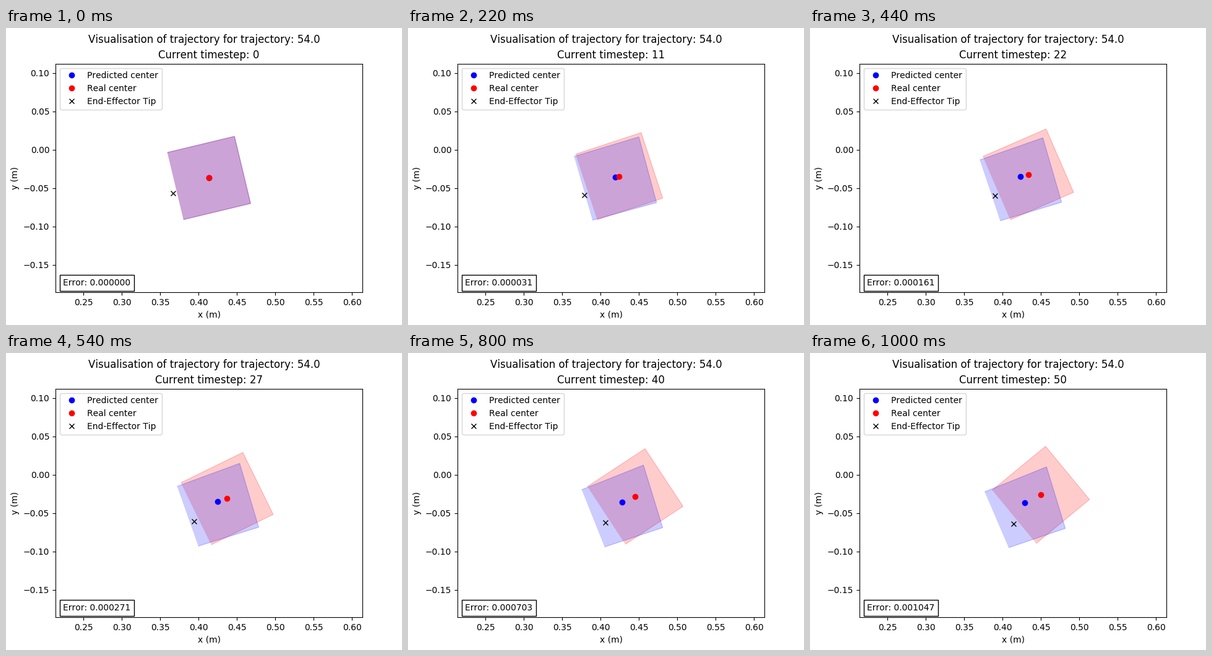
A matplotlib script that plays this animation: 640x480 px, repeating every 1020 ms.

```python
import matplotlib.pyplot as plt
import numpy as np
from matplotlib.animation import FuncAnimation
from matplotlib.patches import Polygon

plt.rcParams["text.kerning_factor"] = 6     # plain advance widths

FRAMES, INTERVAL = 51, 20
CENTER = np.array([0.4137, -0.0368])        # start of the square, middle of the view
SIDE = 0.09
HALF_VIEW = np.array([0.2, 0.2 * 369.6 / 496])
MM = 0.001

time = np.linspace(0, 1, FRAMES)[:, None]


def glide(start, shift, bow):
    """Move by `shift` mm along a parabola that swells by `bow` mm halfway."""
    return start + MM * (time * shift + 4 * time * (1 - time) * bow)


def square(center, angle):
    """Corners from top left, clockwise."""
    a = np.radians(angle)
    right = np.array([np.cos(a), np.sin(a)]) * SIDE / 2
    up = np.array([-right[1], right[0]])
    return center + np.array([up - right, up + right, right - up, -up - right])


def error_curve():
    """Roughly quadratic growth, fitted through four readings."""
    t = np.array([0.44, 0.66, 0.8, 1])
    e = np.array([161, 448, 703, 1047]) * 1e-6
    return time[:, 0] ** 2 * np.polyval(np.polyfit(t, e / t ** 2, 3), time[:, 0])


real = glide(CENTER, np.array([36.4, 10.6]), np.array([3.9, 0]))
angle = 13.5 + 26 * time[:, 0] - 6 * time[:, 0] * (1 - time[:, 0])
pred = glide(CENTER, np.array([15.6, 0.2]), np.array([2.9, 1.5]))
tip = glide(CENTER + MM * np.array([-46.6, -20.2]),
            np.array([47.6, -6.5]), np.array([1.9, -0.4]))

# The predicted corners drift apart, so the square warps
shifts = np.array([(17.4, -18.7), (10.5, -7.2), (14, 0.1), (27.6, -4)])
bows = np.array([(3.4, -1.5), (1.1, 1.3), (3, 1.6), (4.5, 0.2)])
corners = np.stack([glide(*c) for c in zip(square(CENTER, angle[0]), shifts, bows)],
                   axis=1)
error = error_curve()

fig, ax = plt.subplots(figsize=(6.4, 4.8), dpi=100)
fig.suptitle("Visualisation of trajectory for trajectory: 54.0")
low, high = CENTER - HALF_VIEW, CENTER + HALF_VIEW
ax.set(xlim=(low[0], high[0]), ylim=(low[1], high[1]),
       xlabel="x (m)", ylabel="y (m)")
title = ax.set_title("")

real_box, pred_box = [
    ax.add_patch(Polygon(corners[0], closed=False, color=c, alpha=0.2))
    for c in ("red", "blue")]
pred_dot, = ax.plot([], [], "o", color="blue", label="Predicted center")
real_dot, = ax.plot([], [], "o", color="red", label="Real center")
tip_mark, = ax.plot([], [], "x", color="black", label="End-Effector Tip")
ax.legend(loc="upper left")
note = ax.text(CENTER[0] - 0.19, CENTER[1] - 0.14, "",
               bbox=dict(facecolor="white", edgecolor="black"))


def update(n):
    title.set_text(f"Current timestep: {n}")
    note.set_text(f"Error: {error[n]:.6f}")
    real_box.set_xy(square(real[n], angle[n]))
    pred_box.set_xy(corners[n])
    for mark, pos in ((pred_dot, pred), (real_dot, real), (tip_mark, tip)):
        mark.set_data(pos[n, :1], pos[n, 1:])
    return title, note, real_box, pred_box, pred_dot, real_dot, tip_mark


anim = FuncAnimation(fig, update, frames=FRAMES, interval=INTERVAL,
                     repeat=True, repeat_delay=0)
plt.show()
```
